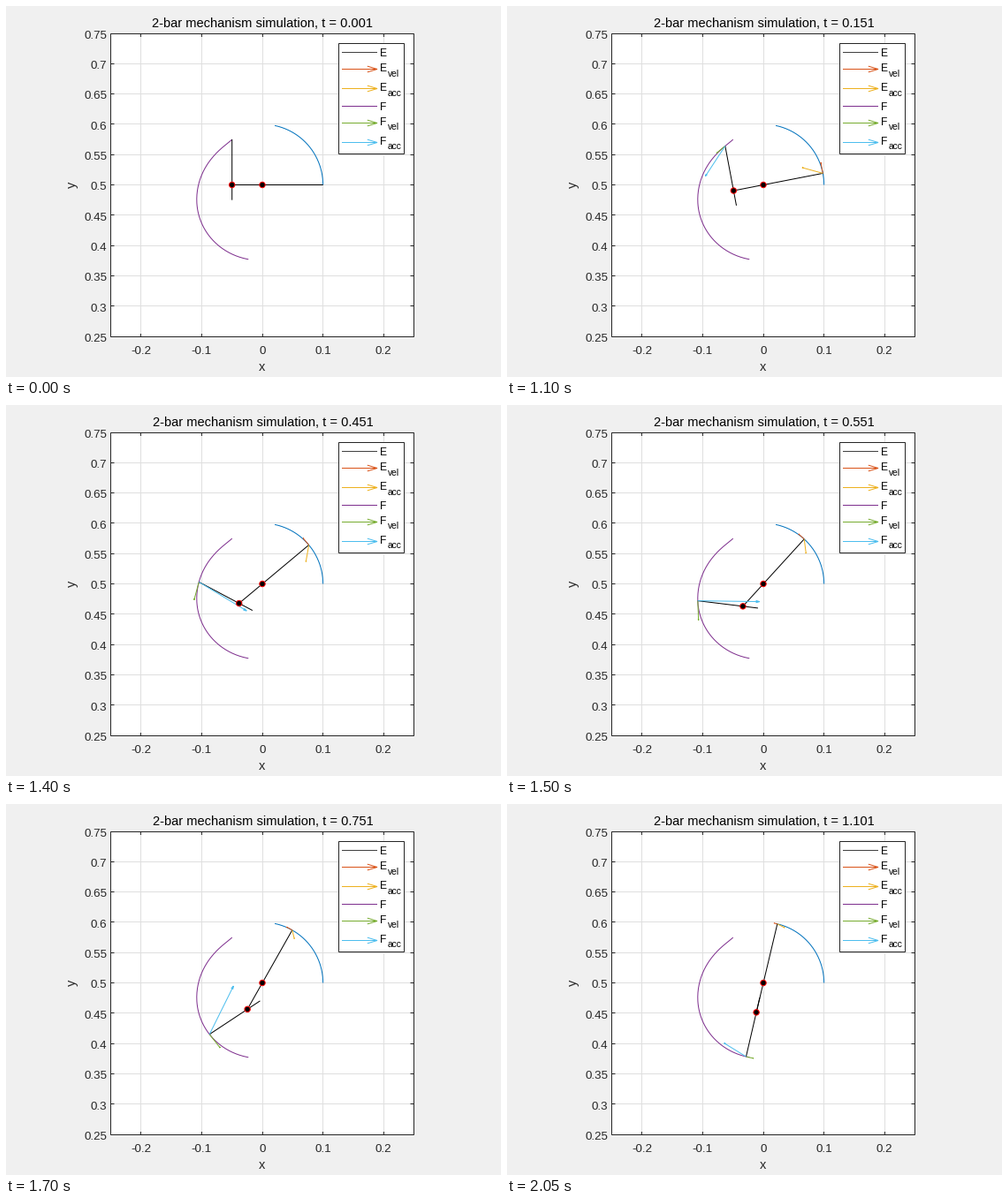
Recreate the animation shown at these times as a matplotlib script. Size 560x420 px, loop 2100 ms.

```python
import numpy as np
import matplotlib.pyplot as plt
from matplotlib.animation import FuncAnimation

W, H, DPI = 560, 420, 100
PX = 72 / DPI
LEFT, RIGHT, TOP, BOTTOM = 118.5, 461.5, 31, 374
SCALE = 686              # pixels per unit
PIVOT = 0.5j
HOLD, STEPS, DT = 20, 22, 0.05
ARROW_GAIN = 0.1

BLUE, ORANGE, YELLOW = "#0072BD", "#D95319", "#EDB120"
PURPLE, GREEN, CYAN = "#7E2F8E", "#77AC30", "#4DBEEE"
INK, GRID, DARK = "#262626", "#DFDFDF", "#404040"

# time, then angle, rate and acceleration of each bar
KNOTS = np.array([
    (0.000, 0.000, 0.00, 28.0, np.pi / 2, 0.00, 18.0),
    (0.051, 0.033, 1.18, 14.5, 1.594, 0.92, 20.2),
    (0.151, 0.192, 1.78, 1.57, 1.757, 2.16, 7.6),
    (0.451, 0.697, 1.46, -1.80, 2.653, 3.58, 2.45),
    (0.651, 0.949, 1.12, -1.15, 3.388, 3.57, -3.05),
    (0.901, 1.196, 0.83, -1.37, 4.137, 2.31, -5.9),
    (1.101, 1.338, 0.57, -1.32, 4.485, 1.26, -4.5),
    (1.151, 1.365, 0.51, -1.20, 4.542, 1.04, -4.2),
])


def quintic(t, col):
    """Angle, rate and acceleration from a quintic Hermite spline."""
    i = int(np.clip(np.searchsorted(KNOTS[:, 0], t) - 1, 0, len(KNOTS) - 2))
    h = KNOTS[i + 1, 0] - KNOTS[i, 0]
    powers = np.array([1, h, h * h])
    p0, v0, a0 = KNOTS[i, col:col + 3] * powers
    p1, v1, a1 = KNOTS[i + 1, col:col + 3] * powers
    dp, dv, da = p1 - p0 - v0 - a0 / 2, v1 - v0 - a0, a1 - a0
    poly = np.poly1d([6 * dp - 3 * dv + da / 2,
                      -15 * dp + 7 * dv - da,
                      10 * dp - 4 * dv + da / 2,
                      a0 / 2, v0, p0])
    u = (t - KNOTS[i, 0]) / h
    return poly(u), poly.deriv()(u) / h, poly.deriv(2)(u) / h ** 2


def spin(radius, state):
    """Position, velocity and acceleration of a rotating arm."""
    angle, rate, acc = state
    z = radius * np.exp(1j * angle)
    return np.array([z, 1j * rate * z, (1j * acc - rate ** 2) * z])


def pose(t):
    e = spin(0.1, quintic(t, 1))
    arm = spin(0.075, quintic(t, 4))
    joint = -0.5 * e
    f = joint + arm
    tail = joint[0] - arm[0] / 3
    e[0] += PIVOT
    f[0] += PIVOT
    return e, f, joint[0] + PIVOT, tail + PIVOT


def to_px(z):
    z = np.asarray(z)
    return (LEFT + (z.real + 0.25) * SCALE, BOTTOM - (z.imag - 0.25) * SCALE)


def crisp(v):
    """Centre of the pixel that holds v."""
    return np.floor(v) + 0.5


def arrow_points(base, vec, head=0.06):
    tip = base + vec
    left, right = (tip - head * vec * (1 + s * 0.3j) for s in (1, -1))
    gap = complex(np.nan, np.nan)
    return np.array([base, tip, gap, left, tip, right])


fig = plt.figure(figsize=(W / DPI, H / DPI), dpi=DPI, facecolor="#F0F0F0")
ax = fig.add_axes([0, 0, 1, 1])
ax.set_xlim(0, W)
ax.set_ylim(H, 0)
ax.axis("off")


def line(x=(), y=(), color=INK, z=2):
    return ax.plot(x, y, color=color, lw=PX, zorder=z, snap=False,
                   solid_joinstyle="bevel", solid_capstyle="butt")[0]


def text(x, y, s, size, color=INK, ha="left", va="baseline", **kw):
    return ax.text(x, y, s, fontsize=size * PX, color=color, ha=ha, va=va,
                   family="Liberation Sans", zorder=8, **kw)


def box(x0, y0, x1, y1, z):
    x0, y0, x1, y1 = crisp(np.array([x0, y0, x1, y1]))
    ax.add_patch(plt.Rectangle((x0, y0), x1 - x0, y1 - y0, fc="white",
                               ec=INK, lw=PX, zorder=z, snap=False))


# Axes, grid and ticks
box(LEFT, TOP, RIGHT, BOTTOM, 1.5)
TICK = 4
for v in (-0.2, -0.1, 0, 0.1, 0.2):
    x = to_px(v + PIVOT)[0]
    col = [crisp(x)] * 2
    line(col, [TOP + 1, BOTTOM], GRID, 1.6)
    line(col, [TOP, TOP + TICK])
    line(col, [BOTTOM, BOTTOM - TICK + 1])
    text(x, 394, f"{v:g}", 13.33, ha="center")
for k in range(11):
    v = 0.25 + 0.05 * k
    y = to_px(1j * v)[1]
    row = [crisp(y)] * 2
    if 0 < k < 10:
        line([LEFT + 0.5, RIGHT - 0.5], row, GRID, 1.6)
        line([LEFT, LEFT + TICK], row)
        line([RIGHT, RIGHT - TICK], row)
    text(114.3, y + 5.8, f"{v:.2f}".rstrip("0"), 13.33, ha="right")
text(290, 413, "x", 14.67, ha="center")
text(75, 202, "y", 14.67, ha="center", va="center", rotation=90)
title = text(290.4, 24, "", 14.67, "black", ha="center")

# Paths traced by both end points
track = [pose(t) for t in np.linspace(0, KNOTS[-1, 0], 160)]
line(*to_px([p[0][0] for p in track]), BLUE)
line(*to_px([p[1][0] for p in track]), PURPLE)

# Legend
box(376, 42, 450, 167, 6)
rows = [(52, "E", "", DARK), (71, "E", "vel", ORANGE),
        (93, "E", "acc", YELLOW), (113, "F", "", PURPLE),
        (132, "F", "vel", GREEN), (154, "F", "acc", CYAN)]
for y, name, sub, color in rows:
    y = crisp(y)
    if sub:
        pts = arrow_points(380 + 1j * y, 40, 0.28)
        line(pts.real, pts.imag, color, 7)
        text(432, y + 8, sub, 10.2, "black")
    else:
        line([380, 420], [y, y], color, 7)
    text(423, y + (2.5 if sub else 4.5), name, 12, "black")

# Moving parts
bars = [line(color="black", z=3) for _ in range(2)]
arrows = [line(color=c, z=4) for c in (ORANGE, YELLOW, GREEN, CYAN)]
pins = [ax.add_patch(plt.Circle(to_px(PIVOT), 3.2, fc="black", ec="red",
                                lw=PX, zorder=5)) for _ in range(2)]


def draw(i):
    k = max(0, i - HOLD + 1)
    t = 0.001 + DT * k
    e, f, joint, tail = pose(t if k else 0)
    bars[0].set_data(*to_px([e[0], joint]))
    bars[1].set_data(*to_px([f[0], tail]))
    pins[1].set_center(to_px(joint))
    vectors = [(p[0], p[n]) for p in (e, f) for n in (1, 2)]
    for art, (base, vec) in zip(arrows, vectors):
        art.set_data(*to_px(arrow_points(base, ARROW_GAIN * vec)))
        art.set_visible(k > 0)
    title.set_text(f"2-bar mechanism simulation, t = {t:.3f}")
    return [*bars, *arrows, *pins, title]


anim = FuncAnimation(fig, draw, frames=HOLD + STEPS, interval=50,
                     repeat=True, repeat_delay=0)
plt.show()
```
